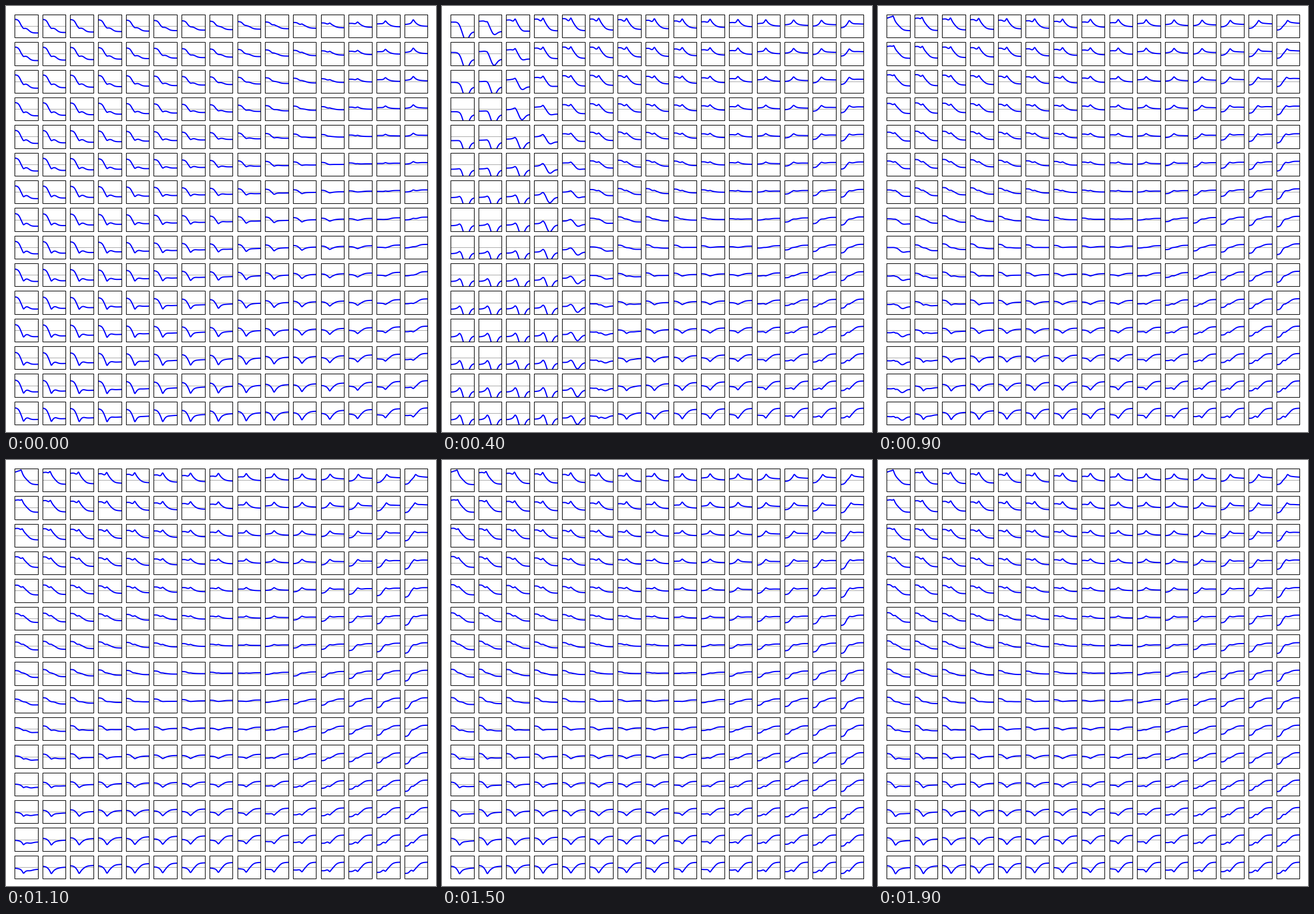
Recreate the animation shown at these times as a matplotlib script. Size 752x745 px, loop 2000 ms.

```python
import numpy as np
import matplotlib.pyplot as plt
from matplotlib.animation import FuncAnimation
from matplotlib.patches import Rectangle

W, H, DPI = 752, 745, 100
N = 15                                 # cells per side
FRAMES, INTERVAL = 20, 100
X0, Y0 = 15.0, 15.0                    # corner of the first cell
BW, BH = 722.2 / 17.8, 717.0 / 17.8    # cell size, gaps are a fifth of it
DX, DY = 1.2 * BW, 1.2 * BH
SWING = 4                              # frame of the widest spread

x = np.linspace(0, 1, 83)
v, u = np.mgrid[0:1:N * 1j, 0:1:N * 1j]    # row and column, 0 to 1


def logistic(z):
    return 1 / (1 + np.exp(-np.clip(z, -50, 50)))


def mix(a, b, f):
    return a + (b - a) * f


def first_map():
    """Nearly linear map: start level, peak and end level of each cell."""
    head = 12 - 9.5 * u**1.5 - 2.5 * v - 4 * u * v
    peak = -4 + 15 * u**2 - 10 * v - 8 * u * v
    tail = -12 + 11.5 * u + v * (1 + 8.5 * u)
    return head, peak, tail


def trained_map(s):
    """Ordered map over the warped column position s."""
    head = (13 - 13 * s - 8 * s**4 - 8 * v * (1 - 0.6 * s**4)
            - 4 * np.sin(np.pi * v) * logistic((s - 0.65) / 0.05))
    peak = (13 - 5 * s) * (1 - 2 * v) + 1
    tail = mix(-8 + 13 * s, 8.5 - 8 * (1 - s)**4, v**2)
    return head, peak, tail


def cell_params(frame):
    age = max(frame - SWING, 0)
    trained = min(frame / SWING, 1)

    # The columns crowd to the right at first, then ease into place.
    shift = 0.3 * 0.5 ** (age / 2)
    s = np.clip((u - shift) / (1 - shift), 0, 1) * (1 - 0.4 * shift)
    head, peak, tail = trained_map(s)

    # A deep valley fills the lower left and then retreats.
    edge = 0.05 + 0.25 * (1 - (1 - v)**2) - 0.5 * (1 - np.exp(-age / 4.5))
    valley = logistic((edge - u) / 0.04)
    halo = logistic((edge + 0.07 - u) / 0.06)
    head = mix(head, -12 + 18 * (1 - v)**4, halo)
    peak = mix(peak, -2 + 10 * v, valley)
    tail = mix(tail, -10.5, halo)

    levels = [mix(a, b, trained) for a, b in zip(first_map(), (head, peak, tail))]
    lean = 0.1 * (u**8 - (1 - u)**8) * (1 - v)**4 * min(age / 2, 1)
    return *levels, valley * trained, 0.385 + lean


def curves(frame):
    head, peak, tail, valley, center = (
        p[..., None] for p in cell_params(frame))
    d = x - center
    cusp = np.exp(-(np.hypot(d, 0.02) - 0.02) / np.where(d < 0, 0.10, 0.14))
    fall = logistic((0.24 + 0.17 * valley - x) / 0.045)
    rise = logistic((x - 0.6) / 0.07)
    pit = np.exp(-0.5 * ((x - 0.64) / 0.13)**2)
    return head * fall + peak * cusp + tail * rise - 24 * valley * pit


fig = plt.figure(figsize=(W / DPI, H / DPI), dpi=DPI, facecolor="white")
ax = fig.add_axes([0, 0, 1, 1])
ax.set_xlim(0, W)
ax.set_ylim(H, 0)
ax.axis("off")

lines = []
for r in range(N):
    for c in range(N):
        left, top = X0 + c * DX, Y0 + r * DY
        mid = top + BH / 2
        box = Rectangle((left, top), BW, BH, fill=False, ec="black", lw=0.8,
                        zorder=3)
        ax.add_patch(box)
        ax.plot([left, left + BW], [mid, mid], color="gray", lw=0.5, zorder=1)
        line, = ax.plot([], [], color="blue", lw=1.5, zorder=2)
        line.set_clip_path(box)
        lines.append(line)


def draw(frame):
    heights = curves(frame)
    for n, line in enumerate(lines):
        r, c = divmod(n, N)
        line.set_data(X0 + c * DX + x * BW,
                      Y0 + r * DY + BH / 2 - heights[r, c])
    return lines


anim = FuncAnimation(fig, draw, frames=FRAMES, interval=INTERVAL,
                     init_func=lambda: draw(0), repeat=True, repeat_delay=0)
plt.show()
```
